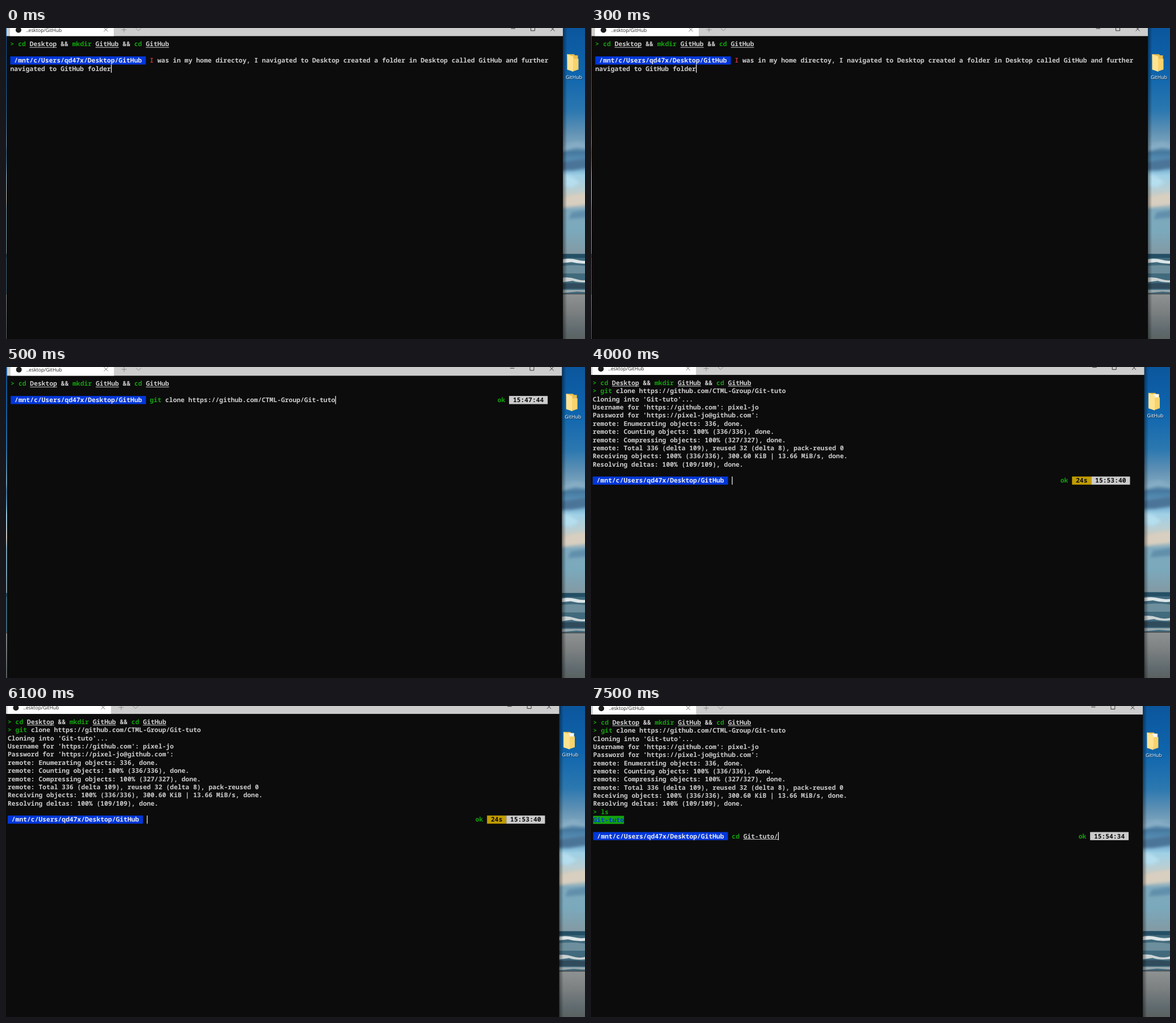
An HTML page that plays this animation: 1021x549 px, repeating every 8000 ms.

```html
<!DOCTYPE html>
<html lang="en">
<head>
<meta charset="utf-8">
<title>Terminal session</title>
<style>
html, body { margin: 0; width: 100%; height: 100%; overflow: hidden; background: #0c0c0c; }
svg { display: block; width: 1021px; height: 549px; }
text { white-space: pre; text-rendering: geometricPrecision; }
.mono { font: 600 11.383px "Noto Sans Mono", "DejaVu Sans Mono", monospace; }
.ui { font-family: "Open Sans", "Noto Sans", sans-serif; }
</style>
</head>
<body>
<svg viewBox="0 0 1021 549">
  <defs>
    <linearGradient id="sky" x2="0" y2="1">
      <stop offset="0" stop-color="#0b559c"/>
      <stop offset=".22" stop-color="#0f65ad"/>
      <stop offset=".38" stop-color="#2c78b0"/>
      <stop offset=".47" stop-color="#5f91b4"/>
      <stop offset=".52" stop-color="#7aa3bd"/>
      <stop offset=".56" stop-color="#47799f"/>
      <stop offset=".61" stop-color="#5f9bc2"/>
      <stop offset=".66" stop-color="#9fd0e6"/>
      <stop offset=".72" stop-color="#b9cfd4"/>
      <stop offset=".76" stop-color="#d0cabd"/>
      <stop offset=".81" stop-color="#7fa9bd"/>
      <stop offset=".9" stop-color="#7ba9bc"/>
      <stop offset="1" stop-color="#8399a3"/>
    </linearGradient>
    <linearGradient id="sand" x2="0" y2="1">
      <stop offset="0" stop-color="#8f9292"/>
      <stop offset=".3" stop-color="#7d8182"/>
      <stop offset=".65" stop-color="#5f6a6e"/>
      <stop offset="1" stop-color="#55574f"/>
    </linearGradient>
    <linearGradient id="shade">
      <stop offset="0" stop-color="#000" stop-opacity=".45"/>
      <stop offset="1" stop-color="#000" stop-opacity="0"/>
    </linearGradient>
    <filter id="soft" x="-30%" width="160%" y="-50%" height="200%"><feGaussianBlur stdDeviation="2.5"/></filter>
  </defs>
  <g id="view">
    <g id="desk">
      <rect x="-20" y="-30" width="1080" height="408" fill="url(#sky)"/>
      <g filter="url(#soft)">
        <path d="M970 186L1000 180L1030 188V194L998 190L970 198Z" fill="#86adc5"/>
        <path d="M970 215L1030 207V224L992 230H970Z" fill="#4c7598"/>
        <path d="M970 236L990 241L1005 252L990 260L970 256Z" fill="#b5deee"/>
        <path d="M970 280L1000 272L1030 268V289L970 296Z" fill="#d8cfc0"/>
        <path d="M990 304L1030 298V312L985 316Z" fill="#608fac"/>
      </g>
      <rect x="-20" y="377.5" width="1080" height="78" fill="#416a7d"/>
      <rect x="-20" y="377.5" width="1080" height="7" fill="#244e64"/>
      <path d="M970 388Q985 384 1000 388T1030 387V393Q1008 397 990 392L970 394Z" fill="#dce5e7"/>
      <path d="M970 399Q1000 395 1030 401V412H970Z" fill="#6d8e9c"/>
      <path d="M970 420Q984 417 998 422T1030 420V426Q1005 430 992 425L970 428Z" fill="#cbd3d4"/>
      <path d="M970 430Q1000 427 1030 432V439H970Z" fill="#2f4b5c"/>
      <path d="M970 441H1030V446L1000 444L970 447Z" fill="#9aa8ad"/>
      <rect x="-20" y="448" width="1080" height="100" fill="url(#sand)"/>
      <rect x="-20" y="447" width="1080" height="2" fill="#4b565b"/>
      <rect x="974" y="-30" width="8" height="590" fill="url(#shade)"/>
      <path d="M982 25H994L996 27H1001V52L983 53Z" fill="#e9bd4d"/>
      <g id="papers">
        <path d="M990 27H1000V52H990Z" fill="#f4f7fa"/>
        <path d="M995 36H999V48H995Z" fill="#3d7fc4"/>
      </g>
      <path d="M982 25L993 29V56L982 52Z" fill="#ffe391"/>
      <path d="M993 33H1002V52L993 55Z" fill="#f9d36c"/>
      <g class="ui" font-size="8.8" text-anchor="middle">
        <text x="994.7" y="69.5" fill="#000" opacity=".65">GitHub</text>
        <text x="994" y="68.7" fill="#fff">GitHub</text>
      </g>
    </g>
    <g id="window">
      <rect x="-6.5" y="-40" width="981" height="600" fill="#0c0c0c"/>
      <rect x="-6.5" y="-40" width="981" height="33" fill="#cdcdcd"/>
      <rect x="-.5" y="-40" width="183" height="33" fill="#fff"/>
      <circle cx="14.5" cy="-17.8" r="5" fill="#1c1c1c"/>
      <text class="ui" x="27.5" y="-14.8" font-size="8.65" fill="#222">..esktop/GitHub</text>
      <g fill="none" stroke="#666" stroke-width=".9">
        <path d="M165 -22l7 7m0 -7l-7 7"/>
        <path d="M196 -18.3h9m-4.5 -4.5v9M221.5 -20.8l4.5 4.5l4.5 -4.5" stroke="#858585"/>
        <path d="M883 -20.3h7.5M918 -23.5h7v7h-7zM953 -23l7 7m0 -7l-7 7" stroke="#222"/>
      </g>
    </g>
    <g id="screens"></g>
  </g>
</svg>
<script>
const CW = 6.83, CH = 14.4, LOOP = 8000;
const GREY = '#cccccc', GREEN = '#13a10e', BLUE = '#0037da', BLACK = '#0c0c0c', RED = '#c5323a';
const $ = id => document.getElementById(id);
const esc = s => s.replace(/&/g, '&amp;').replace(/</g, '&lt;').replace(/>/g, '&gt;');

// A span is a plain string or [text, colour, background, underlined].
const green = s => [s, GREEN];
const link = s => [s, GREY, null, true];
const prompt = [' /mnt/c/Users/qd47x/Desktop/GitHub ', '#ececec', BLUE];
const clock = t => [` ${t} `, BLACK, GREY];

function line(row, spans, col = 0) {
  const top = row * CH;
  let out = '';
  for (const span of spans) {
    const [s, ink = GREY, back, under] = [].concat(span);
    const x = col * CW, w = s.length * CW;
    if (back) out += `<rect x="${x}" y="${top}" width="${w}" height="${CH}" fill="${back}"/>`;
    out += `<text class="mono" x="${x}" y="${top + 11.1}" fill="${ink}">${esc(s)}</text>`;
    if (under) out += `<rect x="${x}" y="${top + 12.4}" width="${w}" height="1" fill="${ink}"/>`;
    col += s.length;
  }
  return out;
}

const caret = (row, col) =>
  `<rect x="${col * CW}" y="${row * CH}" width="1.2" height="${CH}" fill="#fff"/>`;

const url = 'https://github.com/CTML-Group/Git-tuto';
const setup = line(0, [green('> cd '), link('Desktop'), ' && ', green('mkdir '),
  link('GitHub'), ' && ', green('cd '), link('GitHub')]);
const cloned = setup + line(1, [green('> git'), ' clone ' + url]) + [
  "Cloning into 'Git-tuto'...",
  "Username for 'https://github.com': pixel-jo",
  "Password for 'https://pixel-jo@github.com':",
  'remote: Enumerating objects: 336, done.',
  'remote: Counting objects: 100% (336/336), done.',
  'remote: Compressing objects: 100% (327/327), done.',
  'remote: Total 336 (delta 109), reused 32 (delta 8), pack-reused 0',
  'Receiving objects: 100% (336/336), 300.60 KiB | 13.66 MiB/s, done.',
  'Resolving deltas: 100% (109/109), done.'
].map((s, i) => line(i + 2, [s])).join('');

// Each scene has its own slight shift and zoom of the whole view.
const scenes = [
  { at: 0, x: 7.5, y: 21.3, zoom: 1, papers: false,
    body: setup
      + line(2, [prompt, ' ', ['I', RED],
        ' was in my home directoy, I navigated to Desktop created a folder in Desktop called GitHub and further'])
      + line(3, ['navigated to GitHub folder']) + caret(3, 26) },
  { at: 500, x: 8.3, y: 22.4, zoom: .9974, papers: false,
    body: setup + line(2, [prompt, green(' git'), ' clone ' + url]) + caret(2, 84)
      + line(2, [green('ok '), clock('15:47:44')], 126) },
  { at: 4000, x: 3, y: 20.9, zoom: .998, papers: true,
    body: cloned + line(12, [prompt]) + caret(12, 36)
      + line(12, [green('ok '), [' 24s ', BLACK, '#c19c00'], clock('15:53:40')], 121) },
  { at: 7500, x: 3.8, y: 22, zoom: .9946, papers: true,
    body: cloned + line(11, [green('> ls')]) + line(12, [['Git-tuto', BLUE, GREEN]])
      + line(14, [prompt, green(' cd '), link('Git-tuto/')]) + caret(14, 48)
      + line(14, [green('ok '), clock('15:54:34')], 126) }
];

$('screens').innerHTML = scenes.map(s => `<g>${s.body}</g>`).join('');
const screens = [...$('screens').children];

function draw(t) {
  const now = scenes.findLastIndex(s => t >= s.at);
  const { x, y, zoom, papers } = scenes[now];
  $('view').setAttribute('transform', `translate(${x} ${y}) scale(${zoom})`);
  $('papers').style.display = papers ? '' : 'none';
  screens.forEach((g, i) => g.style.display = i === now ? '' : 'none');
}

const start = performance.now();
function tick() {
  draw((performance.now() - start) % LOOP);
  requestAnimationFrame(tick);
}
tick();
</script>
</body>
</html>
```
